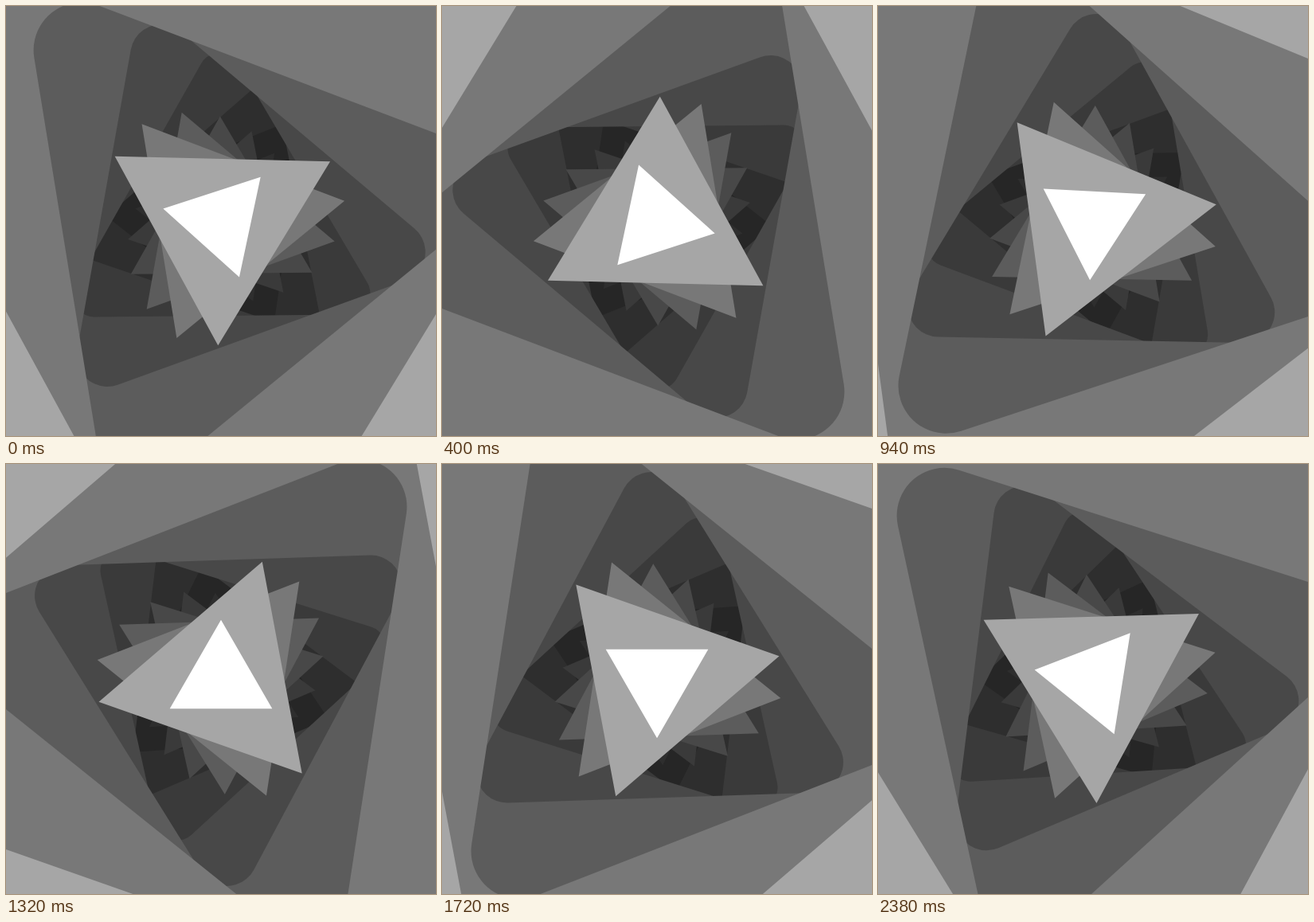
Recreate the animation shown at these times as an HTML page with a canvas. Size 540x540 px, loop 2400 ms.

```html
<!DOCTYPE html>
<html lang="en">
<head>
<meta charset="utf-8">
<title>Triangle tunnel</title>
<style>
  html, body { margin: 0; width: 100%; height: 100%; overflow: hidden; background: #1a1a1a; }
  canvas { display: block; }
</style>
</head>
<body>
<canvas id="stage" width="540" height="540"></canvas>
<script>
const SIZE = 540, LOOP = 2400, STEP = 20;
const RAD = Math.PI / 180, THIRD = Math.PI * 2 / 3;
const TWIST = 19.37;                                  // degrees between neighbouring plates
const GRAYS = [255, 166, 120, 92, 72, 58, 46, 38, 31]; // near to far
const ctx = document.getElementById('stage').getContext('2d');

// A plate covers everything except a triangular ring with round outer corners.
function drawPlate(depth, turn) {
  const z = depth + 2;
  const radius = 1920 / Math.sqrt(3) / z;
  const half = 960 / (z * z);
  const inner = radius - 2 * half;
  const start = (turn + TWIST * depth - 90) * RAD;
  const corners = [0, 1, 2].map(i => start + i * THIRD);

  ctx.beginPath();
  ctx.rect(-SIZE / 2, -SIZE / 2, SIZE, SIZE);
  ctx.closePath();
  corners.forEach((a, i) => {
    const x = radius * Math.cos(a), y = radius * Math.sin(a), from = a - THIRD / 2;
    if (!i) ctx.moveTo(x + half * Math.cos(from), y + half * Math.sin(from));
    ctx.arc(x, y, half, from, a + THIRD / 2);
  });
  ctx.closePath();
  corners.forEach((a, i) =>
    ctx[i ? 'lineTo' : 'moveTo'](inner * Math.cos(a), inner * Math.sin(a)));
  ctx.closePath();

  const g = GRAYS[depth];
  ctx.fillStyle = `rgb(${g},${g},${g})`;
  ctx.fill('evenodd');
}

function draw(ms) {
  const turn = 42 + Math.floor(ms % LOOP / STEP) * STEP / LOOP * 360;
  ctx.setTransform(1, 0, 0, 1, SIZE / 2, SIZE / 2);
  ctx.fillStyle = '#1a1a1a';
  ctx.fillRect(-SIZE / 2, -SIZE / 2, SIZE, SIZE);
  for (let depth = GRAYS.length - 1; depth >= 0; depth--) drawPlate(depth, turn);
}

const begin = performance.now();
function tick() {
  draw(performance.now() - begin);
  requestAnimationFrame(tick);
}
tick();
</script>
</body>
</html>
```
